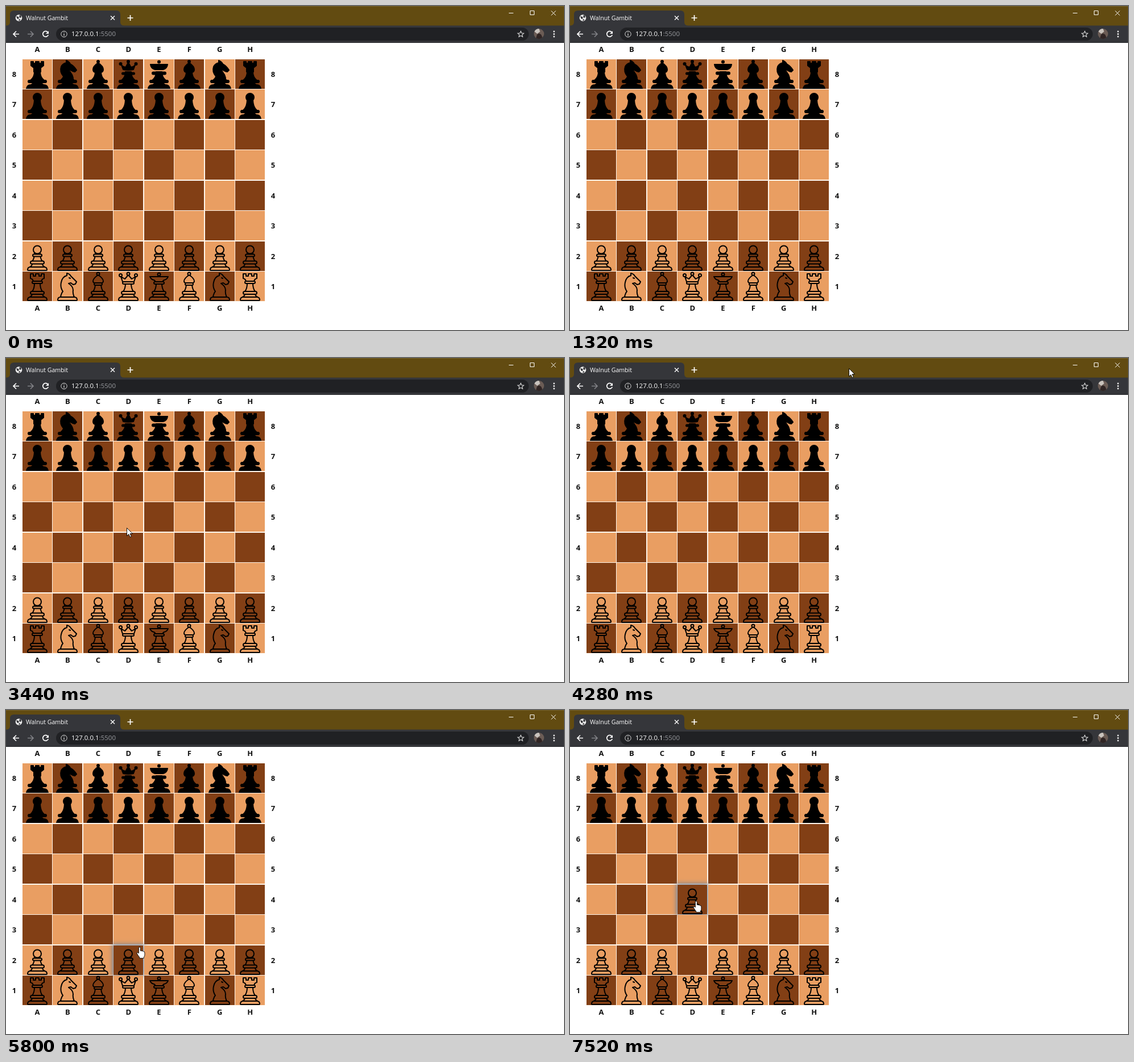
Write an HTML page that moves like this. It is 981x571 px and loops after 8 s.

```html
<!DOCTYPE html>
<html lang="en">
<head>
<meta charset="utf-8">
<title>Walnut Gambit</title>
<style>
  html, body { margin: 0; width: 100%; height: 100%; overflow: hidden; background: #fff; }
  #stage { position: relative; width: 981px; height: 571px; overflow: hidden; }
  #stage > svg { position: absolute; left: 0; top: 0; }
  text { font-family: "Open Sans", "Noto Sans", sans-serif; }
  .label { font-size: 13px; font-weight: 700; text-anchor: middle; fill: #111; }
  .line { fill: none; stroke: #fff; stroke-width: 1.7; }
  .thin { stroke-width: 1; }

  #board { position: absolute; left: 29px; top: 94px; width: 426px; height: 427px; background: #fff6ec; }
  .cell { position: absolute; width: 52px; height: 52px; background: currentColor; }
  .light { color: #e99e62; }
  .dark { color: #823f15; }
  .cell svg { display: block; overflow: hidden; stroke: #000; stroke-width: 2; stroke-linejoin: round; stroke-linecap: round; }
  .white { fill: currentColor; }
  .black { fill: #000; }

  .cell.from, .cell.to, .from svg, .to svg, #pointer, #arrow, #hand { animation: 8s linear infinite; }
  .cell.from { animation-name: hover-from; }
  .cell.to { animation-name: hover-to; }
  .from svg { animation-name: leave; }
  .to svg { animation-name: arrive; }
  #pointer { animation-name: travel; }
  #arrow { animation-name: arrow; }
  #hand { animation-name: hand; }

  @keyframes hover-from {
    0%, 71.2% { box-shadow: 0 0 0 0 #6f839b00; }
    72.2%, 86% { box-shadow: 0 0 8px 2px #6f839b; }
    87.5%, 100% { box-shadow: 0 0 0 0 #6f839b00; }
  }
  @keyframes hover-to {
    0%, 87.5% { box-shadow: 0 0 0 0 #6f839b00; }
    89%, 100% { box-shadow: 0 0 8px 2px #6f839b; }
  }
  @keyframes leave { 0%, 92.99% { opacity: 1; } 93%, 100% { opacity: 0; } }
  @keyframes arrive { 0%, 92.99% { opacity: 0; } 93%, 100% { opacity: 1; } }
  @keyframes arrow {
    0%, 42.49% { opacity: 0; }
    42.5%, 71.49% { opacity: 1; }
    71.5%, 100% { opacity: 0; }
  }
  @keyframes hand { 0%, 71.49% { opacity: 0; } 71.5%, 100% { opacity: 1; } }
  @keyframes travel {
    0%, 43.4% { transform: translate(212px, 299px); animation-timing-function: ease-in-out; }
    53.4%, 58% { transform: translate(490px, 18px); animation-timing-function: ease-in; }
    64% { transform: translate(262px, 240px); }
    66.2% { transform: translate(236px, 350px); animation-timing-function: ease-out; }
    68.4%, 69% { transform: translate(295px, 299px); animation-timing-function: ease-in-out; }
    72.3%, 73.4% { transform: translate(235px, 418px); animation-timing-function: ease-out; }
    75%, 84% { transform: translate(226px, 428px); animation-timing-function: ease-in-out; }
    90%, 100% { transform: translate(222px, 337px); }
  }
</style>
</head>
<body>
<div id="stage">
  <svg id="chrome" width="981" height="571">
    <rect width="981" height="36" fill="#624b11"/>
    <rect width="981" height="1" fill="#75602c"/>
    <path d="M0 34.500q7 0 7-6V15q0-7 7-7h180q7 0 7 7v13.500q0 6 7 6h773v30H0z" fill="#35363a"/>
    <rect y="64" width="981" height="1" fill="#242529"/>
    <rect x="88" y="38" width="831" height="23" rx="11.5" fill="#202124"/>
    <circle cx="22.500" cy="21" r="5.800" fill="#eee"/>
    <path d="M18 18l4 1 1 3-3 1-1-2zM23 17l3-1 1 4-3 1zM22 24l3-1 0 2-2 1z" fill="#35363a"/>
    <text x="35" y="25" font-size="10.600" fill="#fff">Walnut Gambit</text>
    <g class="line">
      <path d="M184 17.500l7 7m0-7l-7 7" stroke-width="1.400"/>
      <path d="M213.500 21h10m-5-5v10"/>
      <path d="M23 49.500H13m5-5l-5 5 5 5"/>
      <path d="M38 49.500h10m-5-5l5 5-5 5" stroke="#818286"/>
      <path d="M73.500 46.200a4.900 4.900 0 1 0 .8 4.800"/>
      <path d="M75 44v5h-5z" fill="#fff" stroke="none"/>
      <circle class="thin" cx="102" cy="49.500" r="5.200" stroke="#ddd"/>
      <path d="M102 49v3.500m0-6v1.200" stroke="#ddd" stroke-width="1.300"/>
      <path d="M905 44.300l1.500 3.500 3.800.3-2.900 2.500.9 3.700-3.300-2-3.300 2 .9-3.700-2.900-2.500 3.800-.3z" stroke="#ddd" stroke-width="1.100"/>
      <path class="thin" d="M884 12.500h8M921.500 8.500h7v7h-7zM958.500 8.500l8 8m0-8l-8 8"/>
    </g>
    <text x="115" y="53" font-size="11.500" fill="#fff">127.0.0.1<tspan fill="#989a9e">:5500</tspan></text>
    <circle cx="937" cy="49" r="9" fill="#6b5c55"/>
    <path d="M929 45a9 9 0 0 1 8-5l2 5-5 4z" fill="#c9c3bd"/>
    <path d="M932 56.500q1-8 5-8t6 7a9 9 0 0 1-11 1z" fill="#302524"/>
    <g fill="#eee"><circle cx="963.500" cy="45" r="1.400"/><circle cx="963.500" cy="49.500" r="1.400"/><circle cx="963.500" cy="54" r="1.400"/></g>
  </svg>
  <div id="board"></div>
  <svg id="overlay" width="981" height="571">
    <g id="labels"></g>
    <g id="pointer">
      <path id="arrow" d="M.5 .5v14l3.300-3.100 2.300 5.200 2.300-1-2.300-5h4.400z" fill="#fff" stroke="#000" stroke-width=".9"/>
      <path id="hand" d="M-1.700 1.500q0-1.700 1.500-1.700t1.600 1.700v5q1.400-1 2.600.4 1.600-.7 2.500.7 2.400-.3 2.400 2.200v4q0 2.200-1.600 3.600v2h-7.600v-1.800q-2.400-2.300-4-5.700-1.300-2 0-2.600 1.200-.5 2.600 1.500z" fill="#fff" stroke="#000" stroke-width=".9"/>
    </g>
  </svg>
</div>
<script>
const PITCH = 53.45;
const disc = (y, half, h = 4) =>
  `<rect x="${26 - half}" y="${y}" width="${2 * half}" height="${h}" rx="${h / 2}"/>`;
const ball = (x, y, r) => `<circle cx="${x}" cy="${y}" r="${r}"/>`;
const path = d => `<path d="${d}"/>`;
// A concave column, symmetric about the middle of the cell.
const flare = (y1, half1, y2, half2) => {
  const bend = y1 + (y2 - y1) * 0.65;
  return path(`M${26 - half1} ${y1}Q${26 - half1} ${bend} ${26 - half2} ${y2}H${26 + half2}Q${26 + half1} ${bend} ${26 + half1} ${y1}z`);
};

const plinth = path('M10 51q-1 0-1-1 0-5 5-5h24q5 0 5 5 0 1-1 1z');
const outlineStand = flare(39, 9, 45, 13) + plinth + flare(21, 5, 35, 9);
const outlined = {
  pawn: outlineStand + disc(34.5, 12, 5) + disc(22.5, 8, 4) + ball(26, 14.5, 7),
  rook: outlineStand + disc(35, 12, 5) + disc(17, 9, 4) + path('M14 4h5v4h4V4h6v4h4V4h5v8q-4 1-5 5H19q-1-4-5-5z'),
  bishop: outlineStand + disc(35, 12, 5) + disc(20, 7, 4) +
    path('M26 6q9 6 9 11 0 3-4 3H21q-4 0-4-3 0-5 9-11z') + ball(26, 4, 2.5),
  queen: outlineStand + disc(35, 12, 5) + disc(18, 10, 4) +
    path('M16 18l-3-9 7 4 6-7 6 7 7-4-3 9z') + ball(12.5, 6.5, 2.5) + ball(26, 4, 2.5) + ball(39.5, 6.5, 2.5),
  king: outlineStand + disc(35, 12, 5) + disc(18, 9, 4) +
    path('M10 9h32q-2 5-7 6-2 1-3 3H20q-1-2-3-3-5-1-7-6z') + ball(26, 5, 2.5),
  knight: path('M14 45q1-7 4-10-5-7-3-16 2-10 10-12V3q5 1 7 5l10 10-2 4-4 1-4-3-4 1q8 5 8 12-1 5 2 12z') +
    path('M29 11l2 1') + plinth,
};

const solidStand = flare(40, 7, 46, 14) + path('M7 52q1-7 7-7h24q6 0 7 7z') + disc(37, 16) + flare(22, 5, 37, 12);
const solid = {
  pawn: solidStand + flare(18, 5, 37, 12) + ball(26, 14, 7),
  rook: solidStand + path('M15 4h4v3h4V4h6v3h4V4h4v7l-5 4v7H20v-7l-5-4z'),
  bishop: solidStand + path('M26 6q9 6 9 12 0 4-4 5H21q-4-1-4-5 0-6 9-12z') + ball(26, 4, 2),
  queen: solidStand + disc(23.5, 11, 3) + path('M17 18l-3-8q5 5 8 3l4-8 4 8q3 2 8-3l-3 8q-9 2-18 0z') +
    ball(12.5, 8, 2) + ball(26, 4, 2) + ball(39.5, 8, 2),
  king: solidStand + disc(22.5, 12, 4) + path('M11 9h30q-1 7-8 9H19q-7-2-8-9z') + ball(26, 4.5, 2),
  knight: solidStand + path('M15 37q4-4 4-7-7-8-4-17 3-6 9-7V2q5 2 7 6 7 4 11 11l-3 3-4-1-3-2-4 1q9 7 8 17z'),
};
const ranks = ['rook', 'knight', 'bishop', 'queen', 'king', 'bishop', 'knight', 'rook'];

function pieceAt(row, col) {
  if (row === 0 || row === 7) return ranks[col];
  if (row === 1 || row === 6 || (row === 4 && col === 3)) return 'pawn';
}

let cells = '', labels = '';
const label = (x, y, s) => { labels += `<text class="label" x="${x}" y="${y}">${s}</text>`; };

for (let row = 0; row < 8; row++) {
  for (let col = 0; col < 8; col++) {
    const name = pieceAt(row, col);
    const [side, shapes] = row < 2 ? ['black', solid] : ['white', outlined];
    const role = col !== 3 ? '' : row === 6 ? 'from' : row === 4 ? 'to' : '';
    const art = name ? `<svg class="${side}" width="52" height="52">${shapes[name]}</svg>` : '';
    cells += `<div class="cell ${(row + col) % 2 ? 'dark' : 'light'} ${role}"
      style="left:${col * PITCH}px;top:${row * PITCH}px">${art}</div>`;
  }
  const along = row * PITCH;
  for (const x of [14.5, 469.5]) label(x, 125 + along, 8 - row);
  for (const y of [81, 537]) label(55 + along, y, 'ABCDEFGH'[row]);
}
document.getElementById('board').innerHTML = cells;
document.getElementById('labels').innerHTML = labels;
</script>
</body>
</html>
```
